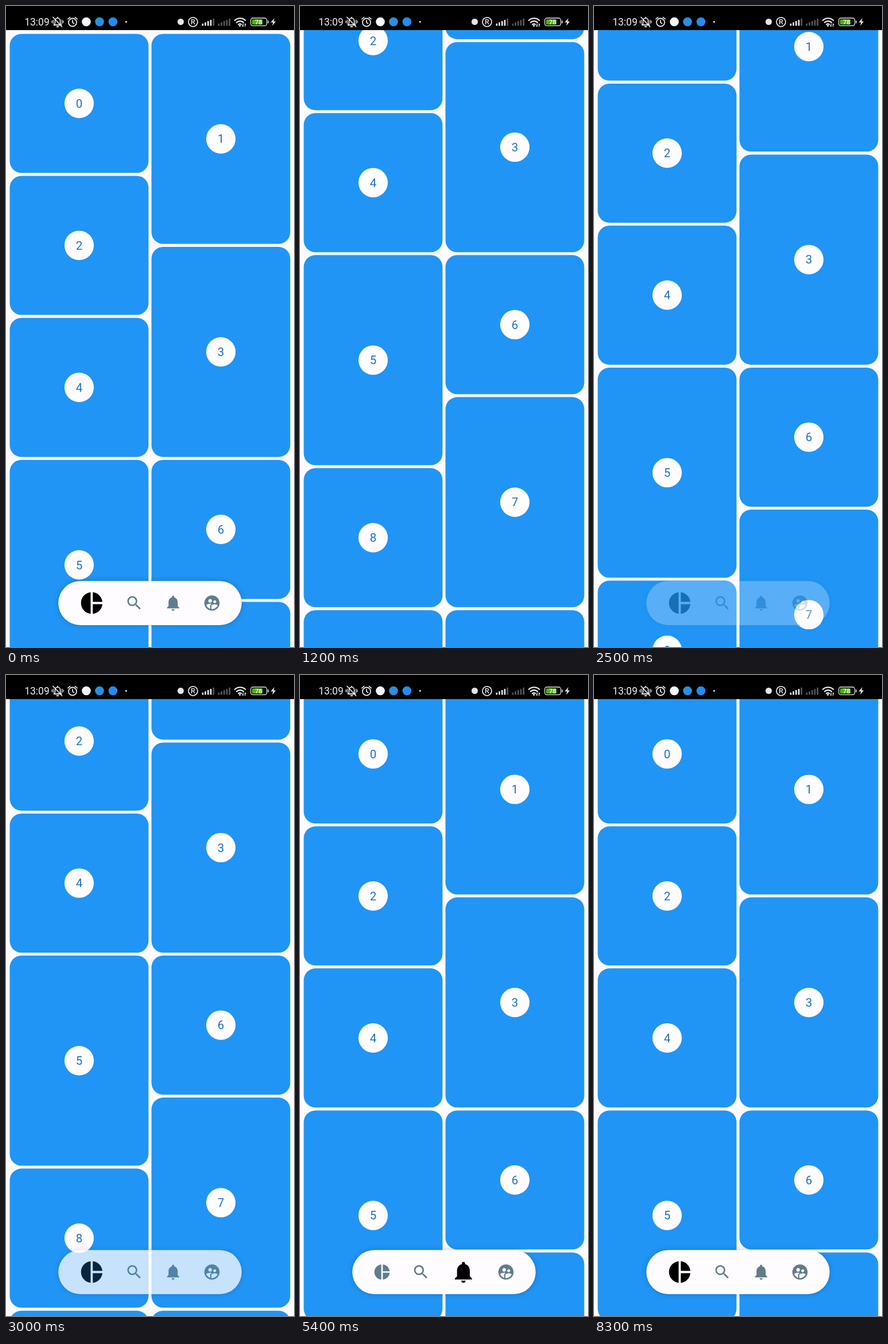
An HTML page for the animation above (8400 ms loop, 502 by 1115 pixels).

```html
<!DOCTYPE html>
<html lang="en">
<head>
<meta charset="utf-8">
<title>Staggered grid with floating navigation</title>
<style>
  html, body { margin: 0; width: 100%; height: 100%; overflow: hidden; background: #fdfbff; }
  svg { display: block; }
  text { font-family: Roboto, sans-serif; text-anchor: middle; }
  .tile { fill: #2095f5; }
  .badge { fill: #fffcff; }
  .num { fill: #1a72c4; font-size: 20.5px; }
  .bar { fill: #fffcff; filter: drop-shadow(0 0 5px rgba(0, 0, 0, .2)); }
  .line { fill: none; stroke: #e6e6e6; stroke-width: 1.8; stroke-linecap: round; stroke-linejoin: round; }
  .thin { stroke-width: 1.3; }
  .thick { stroke-width: 2.3; }
  .solid { fill: #e6e6e6; }
</style>
</head>
<body>
<svg width="502" height="1115" viewBox="0 0 502 1115">
  <rect width="502" height="1115" fill="#fdfbff"/>
  <g id="grid"></g>

  <g id="nav">
    <rect class="bar" x="91.2" y="1000.2" width="319.6" height="76.7" rx="38.35"/>
    <path class="icon" d="M11 2v20c-5.07-.5-9-4.79-9-10s3.93-9.5 9-10zm2.03 0v8.99H22c-.47-4.74-4.24-8.52-8.97-8.99zm0 11.01V22c4.74-.47 8.5-4.25 8.97-8.99h-8.97z"/>
    <path class="icon" d="M15.5 14h-.79l-.28-.27C15.41 12.59 16 11.11 16 9.5 16 5.91 13.09 3 9.5 3S3 5.91 3 9.5 5.91 16 9.5 16c1.61 0 3.09-.59 4.23-1.57l.27.28v.79l5 4.99L20.49 19l-4.99-5zm-6 0C7.01 14 5 11.99 5 9.5S7.01 5 9.5 5 14 7.01 14 9.5 11.99 14 9.5 14z"/>
    <path class="icon" d="M12 22c1.1 0 2-.9 2-2h-4c0 1.1.89 2 2 2zm6-6v-5c0-3.07-1.64-5.64-4.5-6.32V4c0-.83-.67-1.5-1.5-1.5s-1.5.67-1.5 1.5v.68C7.63 5.36 6 7.92 6 11v5l-2 2v1h16v-1l-2-2z"/>
    <path class="icon" d="M11.99 2c-5.52 0-10 4.48-10 10s4.48 10 10 10 10-4.48 10-10-4.48-10-10-10zm3.61 6.34c1.07 0 1.93.86 1.93 1.93 0 1.07-.86 1.93-1.93 1.93-1.07 0-1.93-.86-1.93-1.93-.01-1.07.86-1.93 1.93-1.93zm-6-1.58c1.3 0 2.36 1.06 2.36 2.36 0 1.3-1.06 2.36-2.36 2.36s-2.36-1.06-2.36-2.36c0-1.31 1.05-2.36 2.36-2.36zm0 9.13v3.75c-2.4-.75-4.3-2.6-5.14-4.96 1.05-1.12 3.67-1.69 5.14-1.69.53 0 1.2.08 1.9.22-1.64.87-1.9 2.02-1.9 2.68zM11.99 20c-.27 0-.53-.01-.79-.04v-4.07c0-1.42 2.94-2.13 4.4-2.13 1.07 0 2.92.39 3.84 1.15-1.17 2.97-4.06 5.09-7.45 5.09z"/>
  </g>

  <g id="status">
    <rect width="502" height="41.9" fill="#000"/>
    <text x="54" y="34" font-size="17.5" fill="#efefef">13:09</text>
    <!-- muted bell -->
    <path class="line" d="M83.5 33h13l-1.9-2.8v-4.4a4.6 4.6 0 0 0-9.2 0v4.4zM88.6 36h2.8M90 19.6v1.2M82 19.5l15.5 16.5"/>
    <path class="line thin" d="M82.3 24.5v6M80 26v3M97.7 24.5v6M100 26v3"/>
    <!-- alarm -->
    <circle class="line" cx="116" cy="28.5" r="7"/>
    <path class="line" d="M116 24.8v4l2.6 1.6M108 22.6l3.6-3M124 22.6l-3.6-3"/>
    <circle cx="140" cy="27.5" r="7.8" fill="#f4f8fc"/>
    <circle cx="163" cy="27.5" r="7.8" fill="#2a8fdf"/>
    <circle cx="186.4" cy="27.5" r="7.8" fill="#238cf0"/>
    <circle class="solid" cx="209.4" cy="27.5" r="1.6"/>
    <circle class="solid" cx="304.5" cy="27.5" r="5.5"/>
    <circle class="line" cx="326" cy="27.8" r="8"/>
    <text class="solid" x="326" y="32.2" font-size="12.5" font-weight="500">R</text>
    <g id="signal"></g>
    <!-- wifi -->
    <path class="line thick" d="M398.8 25a13.5 13.5 0 0 1 18.4 0M402 28.6a8.8 8.8 0 0 1 12 0M405.2 32a4.2 4.2 0 0 1 5 0"/>
    <circle class="solid" cx="407.6" cy="34.3" r="1.6"/>
    <path class="line thin" d="M413.3 31v4.6l-1.2-1.3M416.6 35.6V31l1.2 1.3"/>
    <!-- battery -->
    <rect class="line thin" x="426.6" y="21" width="28" height="13.4" rx="3.8"/>
    <rect x="428.8" y="23.2" width="18.5" height="9" rx="1.6" fill="#4fb30d"/>
    <rect class="solid" x="456.2" y="25.2" width="1.6" height="5" rx=".8"/>
    <text x="440.3" y="31.8" font-size="11" font-weight="500" fill="#fff">78</text>
    <path class="solid" d="M467.8 21l-6.4 7.6h4l-1.2 6 6-7.8h-3.8z"/>
  </g>
</svg>

<script>
const LOOP = 8400, STEP = 100;
const $ = id => document.getElementById(id);
const progress = (t, start, length) => Math.min(1, Math.max(0, (t - start) / length));
const smooth = p => p * p * (3 - 2 * p);

function add(parent, name, attrs, text = '') {
  const el = document.createElementNS('http://www.w3.org/2000/svg', name);
  for (const key in attrs) el.setAttribute(key, attrs[key]);
  el.textContent = text;
  parent.appendChild(el);
}

// Masonry: each tile goes into the shorter column; odd tiles are 1.5 units tall.
const UNIT = 247.03, GAP = 5.11, tileW = UNIT - GAP;
const colEnd = [48.4, 48.4];
for (let i = 0; i < 12; i++) {
  const col = colEnd[0] <= colEnd[1] + 1 ? 0 : 1;
  const x = 6.5 + col * UNIT, y = colEnd[col];
  const span = UNIT * (i % 2 ? 1.5 : 1);
  const cx = x + tileW / 2, cy = y + (span - GAP) / 2;
  add($('grid'), 'rect', { class: 'tile', x, y, width: tileW, height: span - GAP, rx: 20.4 });
  add($('grid'), 'circle', { class: 'badge', cx, cy, r: 25.6 });
  add($('grid'), 'text', { class: 'num', x: cx, y: cy + 7.3 }, i);
  colEnd[col] += span;
}

// Two signal meters; the second has no reception.
for (let i = 0; i < 10; i++) {
  const n = i % 5, height = 4 + n * 2.2;
  const x = 341.5 + n * 4.7 + (i > 4 ? 28 : 0);
  add($('signal'), 'rect', { x, y: 34.5 - height, width: 2.8, height, rx: 1, fill: i < 4 ? '#e6e6e6' : '#555' });
}

const swipes = [
  { start: 100, end: 1268, to: 359.7 },
  { start: 1500, end: 2300, to: 56.8 },
  { start: 2300, end: 2800, to: 351.3 },
  { start: 2800, end: 3600, to: 32.1 }
];
const taps = [
  { time: 4200, tab: 1 },
  { time: 5000, tab: 2 },
  { time: 5900, tab: 3 },
  { time: 6900, tab: 0 }
];
const FADE = 267, GROW = 200;

// Scrolling down hides the bar, scrolling up brings it back.
function scrollState(t) {
  let y = 0, opacity = 1;
  for (const { start, end, to } of swipes) {
    if (t < start) break;
    const shown = to < y ? 1 : 0;
    opacity += (shown - opacity) * progress(t, start, FADE);
    y += (to - y) * smooth(progress(t, start, end - start));
  }
  return { y, opacity };
}

// How far each tab is selected, from 0 to 1.
function selection(t) {
  let on = [1, 0, 0, 0];
  for (const { time, tab } of taps) {
    const p = progress(t, time, GROW);
    on = on.map((v, i) => v + ((i === tab ? 1 : 0) - v) * p);
  }
  return on;
}

const icons = document.querySelectorAll('.icon');
const BAR_X = 91.2, BAR_W = 319.6, BAR_MID = 1038.5;
const ICON = 31.95, ICON_ON = 44.73;

function draw(t) {
  const { y, opacity } = scrollState(t);
  $('grid').setAttribute('transform', `translate(0 ${-y})`);
  $('nav').setAttribute('opacity', opacity);

  const on = selection(t);
  const sizes = on.map(v => ICON + (ICON_ON - ICON) * v);
  const space = (BAR_W - sizes.reduce((a, b) => a + b)) / 5;
  let left = BAR_X + space;
  icons.forEach((icon, i) => {
    const size = sizes[i];
    icon.setAttribute('transform', `translate(${left} ${BAR_MID - size / 2}) scale(${size / 24})`);
    icon.setAttribute('fill', `rgb(${[96, 125, 139].map(c => Math.round(c * (1 - on[i])))})`);
    left += size + space;
  });
}

function tick() {
  const t = performance.now() % LOOP;
  draw(Math.floor(t / STEP) * STEP);
  requestAnimationFrame(tick);
}
tick();
</script>
</body>
</html>
```
